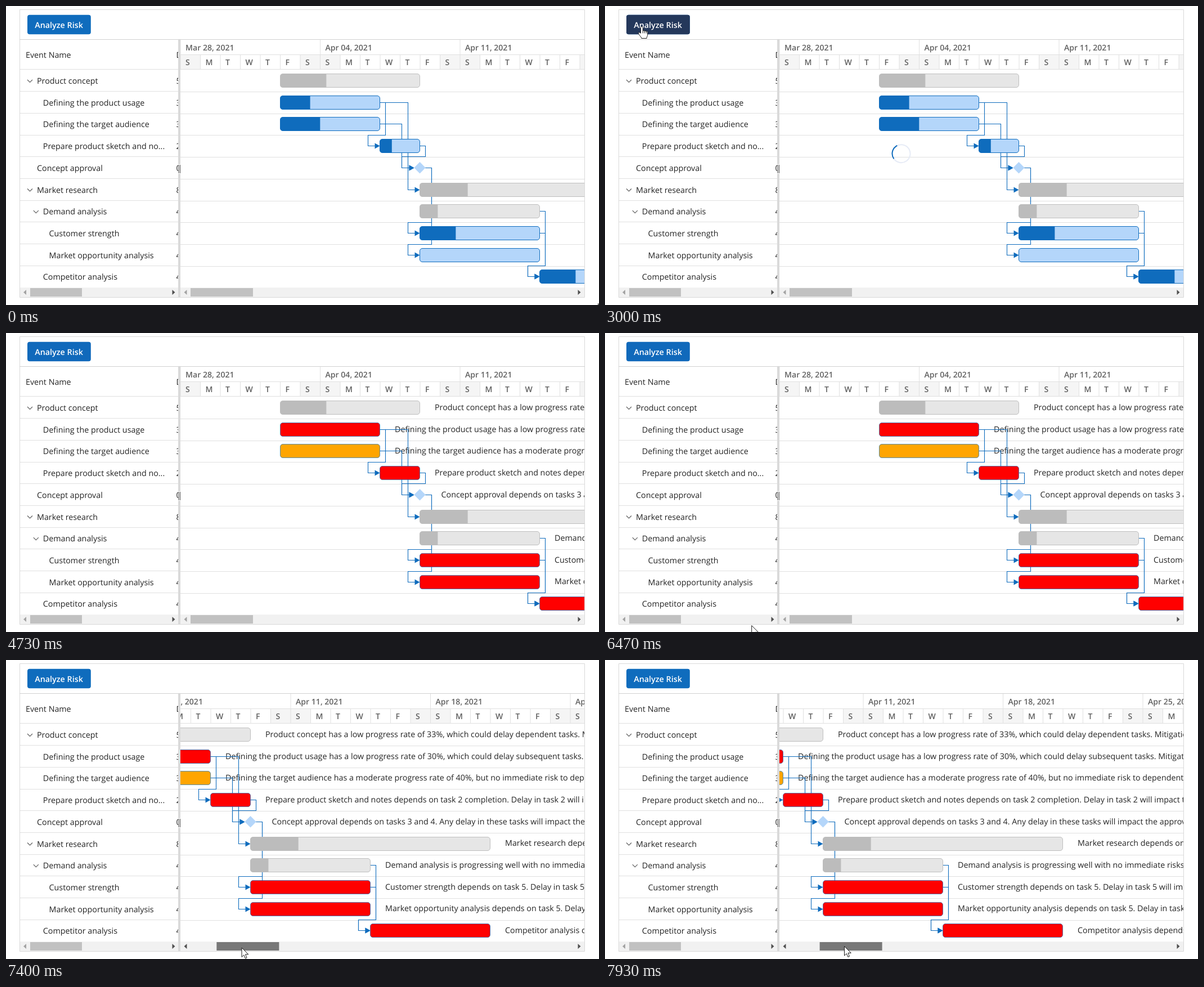
Write an HTML page that moves like this. It is 1054 px wide and 531 px high and loops after 8000 ms.

```html
<!DOCTYPE html>
<html lang="en">
<head>
<meta charset="utf-8">
<title>Gantt risk analysis</title>
<style>
  html, body { margin: 0; width: 100%; height: 100%; overflow: hidden; background: #fff; }
  svg { display: block; }
  text { font: 14.29px "Open Sans", "Noto Sans", sans-serif; fill: #242424; text-rendering: geometricPrecision; white-space: pre; }
  .head { font-size: 14.08px; font-weight: 600; fill: #616161; }
  .btn { font-size: 14.3px; font-weight: 600; fill: #fff; }
  .line { stroke: #e0e0e0; fill: none; }
  .link { stroke: #0f6cbd; fill: none; stroke-width: 1.1; }
  .chevron { stroke: #616161; fill: none; stroke-width: 1.2; }
</style>
</head>
<body>
<script>
const LOOP = 8000, FPS = 15, DAY = 35.5, ROW = 38.7;
const BLUE = '#0f6cbd', LIGHT = '#b4d6fa';

function el(name, attrs, parent) {
  const node = document.createElementNS('http://www.w3.org/2000/svg', name);
  for (const k in attrs) node.setAttribute(k, attrs[k]);
  parent.appendChild(node);
  return node;
}
const root = el('svg', { width: 1054, height: 531 }, document.body);
const rect = (x, y, width, height, fill, p = root, more = {}) =>
  el('rect', { x, y, width, height, fill, ...more }, p);
const path = (d, cls, p = root) => el('path', { d, class: cls }, p);
const shape = (d, fill, p = root) => el('path', { d, fill }, p);
const text = (s, x, y, cls = '', p = root) => {
  el('text', { x, y, class: cls }, p).textContent = s;
};

// name, indent level, duration, first day, last day, progress, risk colour, risk note
const tasks = [
  ['Product concept', 0, 5, 5, 12, .33, '', 'Product concept has a low progress rate of 33%, which could delay dependent tasks. Mitigation is needed.'],
  ['Defining the product usage', 1, 3, 5, 10, .3, 'red', 'Defining the product usage has a low progress rate of 30%, which could delay subsequent tasks. Mitigation is needed.'],
  ['Defining the target audience', 1, 3, 5, 10, .4, 'orange', 'Defining the target audience has a moderate progress rate of 40%, but no immediate risk to dependent tasks.'],
  ['Prepare product sketch and no...', 1, 2, 10, 12, .3, 'red', 'Prepare product sketch and notes depends on task 2 completion. Delay in task 2 will impact this task.'],
  ['Concept approval', 0, 0, 12, 12, 0, '', 'Concept approval depends on tasks 3 and 4. Any delay in these tasks will impact the approval.'],
  ['Market research', 0, 8, 12, 24, .2, '', 'Market research depends on task 2. Delay in task 2 will impact it.'],
  ['Demand analysis', 1, 4, 12, 18, .15, '', 'Demand analysis is progressing well with no immediate risks.'],
  ['Customer strength', 2, 4, 12, 18, .3, 'red', 'Customer strength depends on task 5. Delay in task 5 will impact this task.'],
  ['Market opportunity analysis', 2, 4, 12, 18, 0, 'red', 'Market opportunity analysis depends on task 5. Delay in task 5 will impact this task.'],
  ['Competitor analysis', 1, 4, 18, 24, .3, 'red', 'Competitor analysis depends on tasks 7 and 8.']
];
const parents = [0, 5, 6];
const midY = i => 132.5 + ROW * i;
const dayX = d => Math.ceil(d * DAY) - .5;

// Task list
const list = el('svg', { width: 306, height: 500 }, root);
text('Event Name', 35, 92, '', list);
text('Duration', 302.6, 92, '', list);
path('M25 112.5H306', 'line', list);
tasks.forEach(([name, level, days], i) => {
  const y = 138 + ROW * i, x = 55 + 10.8 * level;
  text(name, x, y, '', list);
  text(days + ' days', 302.6, y, '', list);
  if (parents.includes(i)) path(`M${x - 17} ${y - 7}l4.5 4.5 4.5-4.5`, 'chevron', list);
  path(`M25 ${Math.round(112.5 + ROW * (i + 1)) + .5}H306`, 'line', list);
});

// Timeline
const view = el('svg', { x: 310, width: 718, height: 500 }, root);
for (let i = 1; i < 10; i++) path(`M0 ${Math.round(113.3 + ROW * i) + .5}H718`, 'line', view);
const chart = el('g', {}, view);
['Mar 28', 'Apr 04', 'Apr 11', 'Apr 18', 'Apr 25'].forEach((week, w) => {
  const left = w * 7 * DAY;
  text(week + ', 2021', left + 9, 79, 'head', chart);
  [...'SMTWTFS'].forEach((day, d) => {
    const x = left + d * DAY;
    if (day === 'S') rect(x, 87, DAY, 26, '#f5f5f5', chart);
    text(day, x + 9, 104.7, 'head', chart);
    path(`M${x} ${d ? 87 : 60}V113`, 'line', chart);
  });
});
path('M0 86.5H718M0 112.5H718', 'line', view);

const notes = el('g', {}, chart), links = el('g', {}, chart), bars = el('g', {}, chart);
const plans = el('g', {}, chart), risks = el('g', {}, chart);

// Route leaves a bar, drops to a lane, steps back and enters the next bar
function link(from, to, out, back, lane) {
  const x1 = dayX(tasks[from][4]), x2 = dayX(tasks[to][3]) - (to === 4 ? 10 : 0);
  const y1 = Math.floor(midY(from)) + .5, y2 = Math.floor(midY(to)) + .5;
  const bend = lane ? `V${y2 - lane}H${x2 - back}` : '';
  path(`M${x1} ${y1}H${x1 + out}${bend}V${y2}H${x2 - 8}`, 'link', links);
  shape(`M${x2} ${y2}l-9-5v10z`, BLUE, links);
}
link(1, 3, 10, 21, 19);
link(1, 5, 50, 0, 0);
link(2, 4, 39, 0, 0);
link(3, 4, 10, 22, 20);
link(4, 7, 21, 21, 19);
link(4, 8, 21, 21, 19);
link(6, 9, 10, 21, 19);
link(7, 9, 10, 21, 19);

tasks.forEach(([, , , first, last, done, risk, note], i) => {
  const y = midY(i), x = dayX(first), w = dayX(last) - x, top = Math.round(y - 12.5) + .5, h = 24;
  text(note, last * DAY + (w ? 26 : 37.5), y + 4.3, '', notes);
  if (!w) {
    shape(`M${x} ${y - 10.2}l10.2 10.2-10.2 10.2-10.2-10.2z`, LIGHT, bars);
    return;
  }
  const group = parents.includes(i), layer = group ? bars : plans;
  const edge = { rx: 4.5, stroke: group ? '#bebebe' : BLUE };
  rect(x, top, w, h, group ? '#e6e6e6' : LIGHT, layer, edge);
  if (done) {
    shape(`M${x + w * done} ${top}H${x + 4}a4 4 0 0 0-4 4v${h - 8}a4 4 0 0 0 4 4H${x + w * done}z`,
      group ? '#bcbcbc' : BLUE, layer);
  }
  if (risk) rect(x, top, w, h, risk, risks, { ...edge, 'stroke-width': .7 });
});

// Splitter and scrollbars
rect(25, 500, 1003, 17, '#f1f1f1');
rect(306, 60, 4, 457, '#dadada');
rect(306, 281, 4, 17, '#fff');
path('M307 282V297M309.5 282V297', 'chevron');
rect(43, 501, 92, 15, '#c1c1c1');
const thumb = rect(328, 501, 111, 15, '#c1c1c1');
const tri = (x, dir, fill) => shape(`M${x + 2.5 * dir} 508.5l${-5 * dir}-4.5v9z`, fill);
tri(33.5, -1, '#a3a3a3');
tri(298, 1, '#505050');
const leftArrow = tri(319, -1, '#a3a3a3');
tri(1019, 1, '#505050');

// Frame and toolbar
path('M24.5 6.5H1028.5V517.5H24.5Z', 'line').style.stroke = '#d9d9d9';
path('M24 59.5H1029', 'line').style.stroke = '#d1d1d1';
const face = { rx: 4 };
const button = rect(38, 15.8, 112.8, 34.5, BLUE, root, face);
const hover = rect(38, 15.8, 112.8, 34.5, '#24385b', root, face);
text('Analyze Risk', 51.3, 39, 'btn');

// Spinner
const spinner = el('g', {}, root);
const ring = { r: 16, fill: 'none', 'stroke-width': 2, pathLength: 360 };
el('circle', { ...ring, stroke: '#e6ebf6' }, spinner);
el('circle', { ...ring, stroke: BLUE, 'stroke-dasharray': '99 261' }, spinner);

// Pointers
const pointer = d => el('path', { d, fill: '#fff', stroke: '#1a1a1a', 'stroke-linejoin': 'round' }, root);
const arrowPtr = pointer('M.5 .5V17L4.3 13.4 6.9 19.4 9.5 18.3 7 12.3H12.3Z');
const handPtr = pointer('M-2 12V1.8a1.9 1.9 0 0 1 3.8 0V8c0-1 3-1 3 .4 0-1 3-.8 3 .6 0-.9 2.4-.6 2.4 1V15c0 2-1.6 3-1.6 6H-.6c0-2.5-5-6-5.4-9.2-.2-1.8 2.4-1.8 4 .2ZM4.8 8.4V12M7.8 9V12M1.8 8V12');

// Keys: time, values..., and an optional trailing 'ease' for the stretch that follows
const moves = [
  [800, 1052, 528, 'ease'], [1667, 97, 57], [1733, 94, 47], [1933, 85, 32], [2533, 85, 32, 'ease'],
  [3400, 50, 40], [3933, 46, 47], [4000, 44, 58], [4190, 90, 540], [6400, 250, 540],
  [6466, 260, 519], [6866, 372, 513], [7000, 372, 513], [7200, 402, 512], [7400, 418.5, 510.5],
  [7600, 418.5, 510.5], [7733, 422, 509.5], [7800, 422, 509.5], [7933, 425, 508]
];
const scrolls = [[7000, 0], [7067, 14], [7200, 130], [7333, 262], [7400, 301], [7600, 301], [7733, 323], [7800, 323], [7933, 348]];
const hovers = [[1667, 0], [1867, 1], [4000, 1], [4267, 0]];

function at(keys, t) {
  let i = keys.findIndex(k => k[0] > t);
  if (i < 0) i = keys.length;
  const a = keys[Math.max(i - 1, 0)], b = keys[Math.min(i, keys.length - 1)];
  let u = a === b ? 0 : (t - a[0]) / (b[0] - a[0]);
  if (a.at(-1) === 'ease') u = u * u * (3 - 2 * u);
  return a.slice(1).map((v, n) => v + (b[n + 1] - v) * u);
}
const show = (node, on) => node.setAttribute('visibility', on ? 'visible' : 'hidden');

function draw(now) {
  const t = Math.floor((now % LOOP + 5) * FPS / 1000) % (LOOP * FPS / 1000) * 1000 / FPS;
  const [x, y] = at(moves, t), scroll = Math.round(at(scrolls, t)[0]);
  const analyzed = t > 4720, pressed = t > 7060;

  chart.setAttribute('transform', `translate(${-scroll})`);
  thumb.setAttribute('x', 328 + scroll * .154);
  thumb.setAttribute('fill', pressed ? '#787878' : t > 6600 && x > 328 ? '#a8a8a8' : '#c1c1c1');
  leftArrow.setAttribute('fill', scroll ? '#505050' : '#a3a3a3');

  button.setAttribute('fill', t > 2200 && !pressed ? '#1069bb' : BLUE);
  hover.setAttribute('opacity', at(hovers, t)[0]);

  show(plans, !analyzed);
  show(risks, analyzed);
  show(notes, analyzed);
  show(spinner, t > 2230 && !analyzed);
  spinner.setAttribute('transform', `translate(526.5 262.2) rotate(${117 + (t - 4200) / 1300 * 360})`);

  const over = x > 38 && x < 151 && y > 16 && y < 50;
  show(handPtr, over);
  show(arrowPtr, !over);
  (over ? handPtr : arrowPtr).setAttribute('transform', `translate(${x} ${y})`);
}
const start = performance.now();
function tick() {
  draw(performance.now() - start);
  requestAnimationFrame(tick);
}
tick();
</script>
</body>
</html>
```
